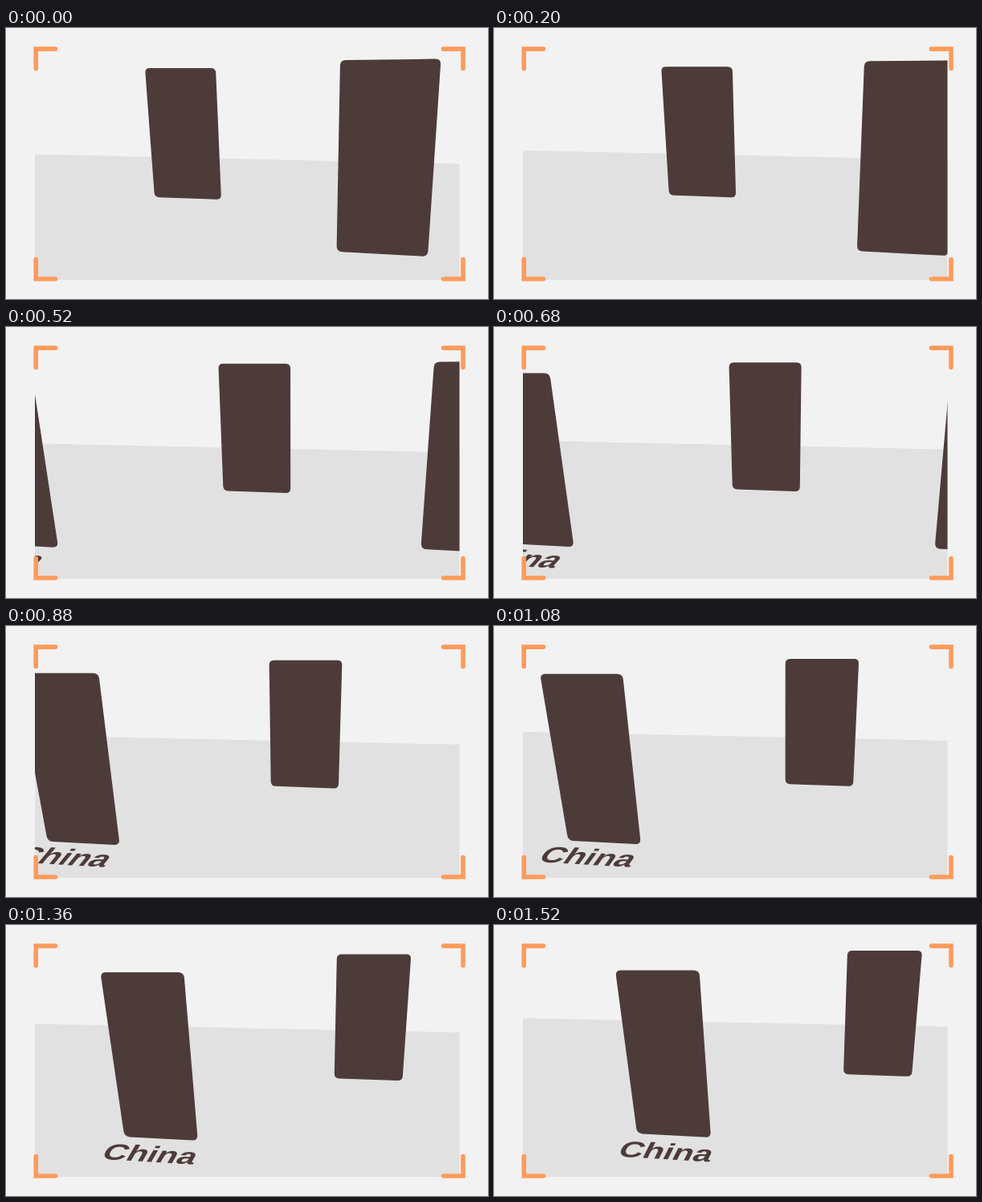
Write an HTML page that moves like this. It is 600x338 px and loops after 2000 ms.

```html
<!DOCTYPE html>
<html lang="en">
<head>
<meta charset="utf-8">
<title>Panels</title>
<style>
  html, body { margin: 0; width: 100%; height: 100%; overflow: hidden; background: #f2f2f2; }
  svg { display: block; width: 100vw; height: 100vh; }
  #floor { fill: #e1e1e1; }
  .panel, #label { fill: #4d3b3a; }
  #label { font: bold 41.5px "Liberation Sans", Arial, sans-serif; }
  #marks { fill: none; stroke: #ff9b5b; stroke-width: 5.6; stroke-linecap: round; }
</style>
</head>
<body>
<svg viewBox="0 0 600 338">
  <clipPath id="view"><rect x="36" y="20" width="528.5" height="294"/></clipPath>
  <g clip-path="url(#view)">
    <path id="floor"/>
    <path id="mid" class="panel"/>
    <path id="right" class="panel"/>
    <path id="left" class="panel"/>
    <text id="label">China</text>
  </g>
  <path id="marks" d="M37.2 50.5V26.1H61.5 M544.5 26.1H569V50.5 M569 288.5V313H544.5 M61.5 313H37.2V288.5"/>
</svg>
<script>
const LOOP = 2000, STEP = 40, PAN = 1520;
const LIFT_START = 1080, LIFT = 5.4;
const $ = id => document.getElementById(id);
const mix = (a, b, p) => a + (b - a) * p;

// Corners TL, TR, BR, BL at both ends of the pan, before the lift.
const panels = {
  mid: {
    from: [[173, 50], [261, 50], [268, 214], [185, 211]],
    to: [[440, 37.4], [533, 37.4], [520, 194.4], [435, 191.4]],
    radius: 6, bow: 0
  },
  right: {
    from: [[416, 40], [541.5, 38.5], [525, 285], [411.5, 279]],
    to: [[758, 50], [897, 52], [832, 279], [718, 273]],
    radius: 7, bow: 0
  },
  left: {
    from: [[-193, 54], [-94, 54], [-51, 277.5], [-138, 273]],
    to: [[151, 62], [255.5, 62], [270, 270.4], [178, 265.4]],
    radius: 7, bow: 7
  }
};

const bowed = (bow, p) => bow * 4 * p * (1 - p);

function roundedPath(pts, r) {
  const toward = ([x, y], [u, v]) => {
    const k = r / Math.hypot(u - x, v - y);
    return [mix(x, u, k), mix(y, v, k)];
  };
  return pts.map((p, i) =>
    `${i ? 'L' : 'M'}${toward(p, pts[(i + 3) % 4])}Q${p} ${toward(p, pts[(i + 1) % 4])}`
  ).join('') + 'Z';
}

function draw(time) {
  const t = Math.min(Math.floor((time % LOOP) / STEP) * STEP, PAN);
  const p = t / PAN;
  const lift = LIFT * (Math.max(0, t - LIFT_START) / (PAN - LIFT_START)) ** 2;

  const y = mix(157.4, 121.7, p) - lift;
  $('floor').setAttribute('d', `M36 ${y}L565 ${y + mix(12, 10.5, p)}V314H36Z`);

  for (const [id, { from, to, radius, bow }] of Object.entries(panels)) {
    const pts = from.map(([x, y], i) => [
      mix(x, to[i][0], p) + bowed(bow, p),
      mix(y, to[i][1], p) - lift
    ]);
    $(id).setAttribute('d', roundedPath(pts, radius));
  }

  // The label lies on the floor and moves with the left panel.
  const x = mix(-210, 152.5, p) + bowed(panels.left.bow, p);
  const lean = mix(0.85, 0.33, p);
  $('label').setAttribute('transform', `matrix(1 .058 ${-lean} .66 ${x} ${294 - lift})`);
}

const start = performance.now();
function tick() {
  draw(performance.now() - start);
  requestAnimationFrame(tick);
}
tick();
</script>
</body>
</html>
```
